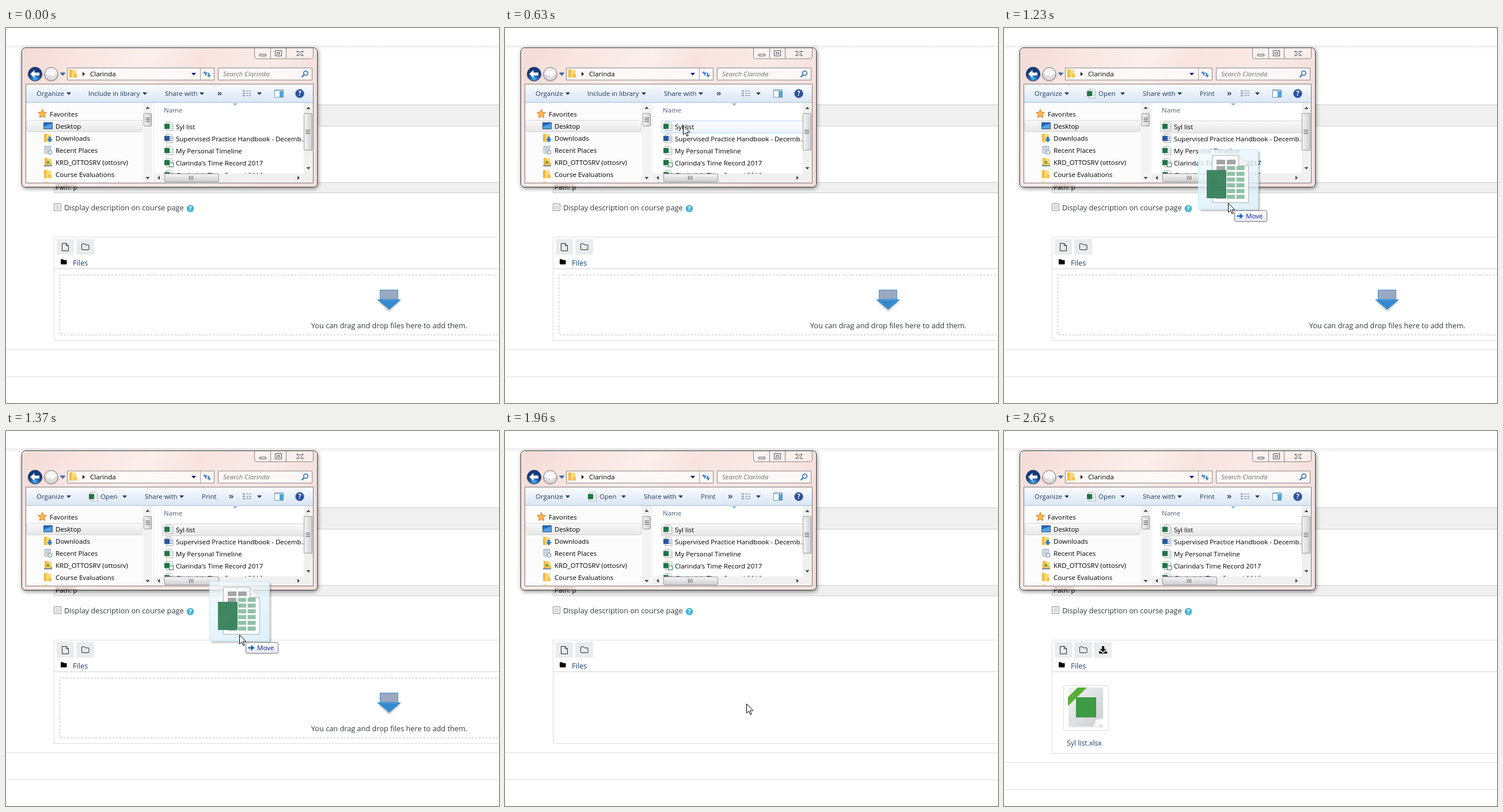
These frames come from a looping animation (856 px wide and 652 px high, 3400 ms). An HTML page:

```html
<!DOCTYPE html>
<html lang="en">
<head>
<meta charset="utf-8">
<title>Drag and drop a file</title>
<style>
html, body { margin: 0; width: 100%; height: 100%; overflow: hidden; background: #fff; }
svg { display: block; }
text { white-space: pre; }
.ui { font: 11.5px "Open Sans", "Noto Sans", sans-serif; fill: #000; }
.page { font: 12.75px "Open Sans", "Noto Sans", sans-serif; fill: #373a3c; }
.bar text { fill: #1e395b; }
.hint { font-style: italic; fill: #707070; }
.more { font-size: 15px; font-weight: 600; }
.link { fill: #14406f; }
.mid { text-anchor: middle; }
.line { fill: none; stroke: #ddd; }
.dash { fill: none; stroke: #bbb; stroke-dasharray: 3 3; }
.box { fill: #e9ecef; }
.ink { fill: none; stroke: #222; }

/* every change is a hard cut on one shared 3.4 s clock */
.t { animation: 3.4s step-end infinite; }
.pointer { animation-name: pointer; }
.path { animation-name: path; }
.ghost { animation-name: ghost; }
.hover { animation-name: hover; }
.picked { animation-name: picked; }
.held { animation-name: held; }
.idle-bar { animation-name: idle-bar; }
.file-bar { animation-name: file-bar; }
.zone { animation-name: zone; }
.invite { animation-name: invite; }
.over { animation-name: over; }
.sending { animation-name: sending; }
.done { animation-name: done; }
.grow { animation-name: grow; }

@keyframes pointer { 0% { opacity: 0 } 1.76% { opacity: 1 } 77.05%, 100% { opacity: 0 } }
@keyframes ghost { 0% { opacity: 0 } 32.05% { opacity: 1 } 57.64%, 100% { opacity: 0 } }
@keyframes hover { 0% { opacity: 0 } 18.52% { opacity: 1 } 21.17%, 100% { opacity: 0 } }
@keyframes picked { 0% { opacity: 0 } 21.17% { opacity: 1 } 32.05%, 100% { opacity: 0 } }
@keyframes held { 0% { opacity: 0 } 32.05%, 100% { opacity: 1 } }
@keyframes idle-bar { 0% { opacity: 1 } 29.11%, 100% { opacity: 0 } }
@keyframes file-bar { 0% { opacity: 0 } 29.11%, 100% { opacity: 1 } }
@keyframes zone { 0% { opacity: 1 } 57.64%, 100% { opacity: 0 } }
@keyframes invite { 0% { opacity: 1 } 43.23%, 100% { opacity: 0 } }
@keyframes over { 0% { opacity: 0 } 43.23% { opacity: 1 } 57.64%, 100% { opacity: 0 } }
@keyframes sending { 0% { opacity: 0 } 62.35% { opacity: 1 } 66.47%, 100% { opacity: 0 } }
@keyframes done { 0% { opacity: 0 } 68.23%, 100% { opacity: 1 } }
@keyframes grow { 0% { transform: none } 68.23%, 100% { transform: translateY(17px) } }
@keyframes path {
  0% { transform: translate(601px, 485px) }
  3.82% { transform: translate(560px, 428px) }
  6.17% { transform: translate(505px, 357px) }
  8.23% { transform: translate(445px, 290px) }
  10.29% { transform: translate(390px, 234px) }
  12.35% { transform: translate(346px, 196px) }
  14.41% { transform: translate(320px, 176px) }
  16.76% { transform: translate(309px, 169px) }
  29.11% { transform: translate(313px, 174px) }
  32.05% { transform: translate(322px, 192px) }
  33.82% { transform: translate(352px, 243px) }
  36.17% { transform: translate(389px, 304px) }
  38.52% { transform: translate(405px, 354px) }
  40.88% { transform: translate(412px, 400px) }
  43.23% { transform: translate(416px, 433px) }
  44.99% { transform: translate(417px, 453px) }
  47.35% { transform: translate(418px, 465px) }
  49.7% { transform: translate(419px, 471px) }
  51.47% { transform: translate(419px, 474px) }
  70.58% { transform: translate(424px, 500px) }
  72.35% { transform: translate(434px, 550px) }
  74.7%, 100% { transform: translate(446px, 612px) }
}
</style>
</head>
<body>
<svg width="856" height="652" viewBox="0 0 856 652">
<defs>
  <linearGradient id="glass" x2="1" y2=".25">
    <stop stop-color="#f3dbd7"/><stop offset=".2" stop-color="#f9e5e1"/>
    <stop offset=".42" stop-color="#fcefec"/><stop offset=".58" stop-color="#f8e3df"/>
    <stop offset=".8" stop-color="#faeae6"/><stop offset="1" stop-color="#f4dfdb"/>
  </linearGradient>
  <linearGradient id="tools" x2="0" y2="1">
    <stop stop-color="#fbfdff"/><stop offset=".5" stop-color="#e8f0f9"/><stop offset="1" stop-color="#d9e6f3"/>
  </linearGradient>
  <linearGradient id="gray" x2="0" y2="1"><stop stop-color="#fafafa"/><stop offset="1" stop-color="#e6e6e6"/></linearGradient>
  <linearGradient id="thumb" x2="0" y2="1"><stop stop-color="#f6f6f6"/><stop offset="1" stop-color="#cfcfd2"/></linearGradient>
  <linearGradient id="thumbV"><stop stop-color="#f6f6f6"/><stop offset="1" stop-color="#cfcfd2"/></linearGradient>
  <linearGradient id="pale" x2="0" y2="1"><stop stop-color="#fcfdff"/><stop offset="1" stop-color="#e9f3fd"/></linearGradient>
  <linearGradient id="blue" x2="0" y2="1"><stop stop-color="#dcebfc"/><stop offset="1" stop-color="#bfdbfb"/></linearGradient>
  <linearGradient id="top" x2="0" y2="1"><stop stop-color="#ededed"/><stop offset="1" stop-color="#fff"/></linearGradient>
  <linearGradient id="tip" x2="0" y2="1"><stop stop-color="#fff"/><stop offset="1" stop-color="#e4e5f0"/></linearGradient>
  <linearGradient id="veil" x2=".6" y2="1"><stop stop-color="#f2fafe"/><stop offset="1" stop-color="#d9eef8"/></linearGradient>
  <linearGradient id="paper" x2="1" y2="1"><stop stop-color="#f1f2f3"/><stop offset="1" stop-color="#cbcfd3"/></linearGradient>
  <radialGradient id="ball" cy=".85"><stop stop-color="#4fb4f0"/><stop offset=".6" stop-color="#1d5fb4"/><stop offset="1" stop-color="#143b7c"/></radialGradient>
  <filter id="soft" x="-10%" y="-10%" width="120%" height="120%"><feGaussianBlur stdDeviation="3.500"/></filter>
  <filter id="blur" x="-30%" y="-60%" width="160%" height="220%"><feGaussianBlur stdDeviation="1.600"/></filter>
  <clipPath id="nav"><path d="M35 130h203v138H35z"/></clipPath>
  <clipPath id="list"><path d="M257 130h260v123H257z"/></clipPath>
  <path id="down" d="M-4-2h8l-4 4.500z"/>
  <g id="sheet">
    <path d="M3.500.5h8l3.500 3.500v11.500h-11.500z" fill="#fff" stroke="#a9a9a9"/>
    <path d="M9 5.500h5M9 8.500h5M9 11.500h5" stroke="#7fb295" stroke-dasharray="2 1"/>
    <path d="M0 3.500h9v9H0z" fill="#217346"/>
  </g>
  <g id="doc">
    <path d="M3.500.5h8l3.500 3.500v11.500h-11.500z" fill="#fff" stroke="#a9a9a9"/>
    <path d="M9 5.500h5M9 8.500h5M9 11.500h5" stroke="#5c7bb5"/>
    <path d="M0 3.500h9v9H0z" fill="#2b579a"/>
  </g>
  <g id="folder">
    <path d="M1 1h6v14H1z" fill="#f3b93f"/><path d="M5 2l8 0v12l-8 2z" fill="#fbd978"/><path d="M9 9h5v6H9z" fill="#f5c24d"/>
  </g>
</defs>

<!-- course page -->
<path d="M0 30h856v7H0z" fill="url(#top)"/>
<path d="M83.500 133.500H870v37H83.500z" fill="#f0f0f0" stroke="#ccc"/>
<path d="M83.500 268.500H870v18H83.500z" fill="#f0f0f0" stroke="#ccc"/>
<path d="M83.500 305.500h12v12h-12z" fill="#f4f4f4" stroke="#8e8f8f"/>
<path d="M86 308h7v7h-7z" fill="#d9dbdd"/>
<text class="page" x="101" y="317">Display description on course page</text>
<circle cx="320" cy="314" r="6.300" fill="#45b5d6"/>
<text class="mid" x="320" y="317.800" font-family="Open Sans, sans-serif" font-size="10.500" font-weight="700" fill="#fff">?</text>

<g class="line">
  <path d="M870 363.500H83.500V543"/>
  <path d="M84 418.500h780" stroke-width="1.600"/>
  <path class="t done" d="M83.500 540v21"/>
  <path class="t grow" d="M83 543.500h780M0 559.500h856M0 606.500h856"/>
</g>
<path class="box" d="M88 367h30v27H88zM122 367h31v27h-31z"/>
<path class="ink" d="M97.500 374.500h7l4 4v9h-11zM104.500 374.500v4h4"/>
<path class="ink" d="M131.500 384.500v-8.500q0-1 1-1h3.500l1.500 2h5.500q1 0 1 1v6.500q0 1-1 1h-10.500q-1 0-1-1z"/>
<path d="M95 410v-7q0-1 1-1h3l1.500 1.500h4q1 0 1 1v5.500q0 1-1 1h-8.500q-1 0-1-1z"/>
<text class="page link" x="116" y="413">Files</text>

<g class="t zone">
  <path d="M646 475l19 18 20-18z" fill="#777" opacity=".45" filter="url(#blur)"/>
  <path d="M649.500 455.500h31v17h-31z" fill="#9ba8c2" stroke="#4a90cf"/>
  <path d="M644 472h42l-20.500 17.500z" fill="#348ad0"/>
  <path d="M650 471h30v3h-30z" fill="#4c96d3"/>
</g>
<g class="t invite">
  <path class="dash" d="M870 429.500H93.500V533.500H870"/>
  <text class="page mid" x="665.500" y="522">You can drag and drop files here to add them.</text>
</g>
<g class="t over">
  <path class="dash" d="M870 429.500H93.500V533.500H870" style="stroke:#6c8cd3"/>
  <text class="page mid" x="665" y="522">Drop files here to upload</text>
</g>
<text class="page t sending" x="94" y="445" style="font-size:11.500px">Syl list.xlsx</text>

<g class="t done">
  <path class="box" d="M156 367h31v27h-31z"/>
  <path d="M170 374h4v5h3.500l-5.500 5.500-5.500-5.500h3.500zM165 383h3l4 3.500 4-3.500h3v4h-14z" fill="#1b1b1b"/>
  <path d="M103.500 442.500h78v78h-78z" fill="#fff" stroke="#ddd"/>
  <path d="M113 514h52l6-6v7h-58z" fill="#888" opacity=".4" filter="url(#blur)"/>
  <path d="M112 446h60v54q-7 13-18 14h-42z" fill="url(#paper)"/>
  <path d="M172 500q-9 1-13 2 0 8-5 12 12-2 18-14z" fill="#fafafa"/>
  <path d="M111 463l17-17h16l-33 32z" fill="#58ad36"/>
  <path d="M125 463h35v35h-35z" fill="#3f9a46"/>
  <text class="page link" x="109" y="547" style="font-size:12.300px">Syl list.xlsx</text>
</g>

<!-- file window -->
<rect x="28" y="36" width="514" height="243" rx="7" opacity=".5" filter="url(#soft)"/>
<rect x="27.500" y="34.500" width="513" height="242" rx="6.500" fill="url(#glass)" stroke="#3d3535"/>
<rect x="28.500" y="35.500" width="511" height="240" rx="5.500" fill="none" stroke="#fff" opacity=".75"/>
<path d="M88 272h30v4H88z" opacity=".25" filter="url(#blur)"/>
<text class="ui" x="86" y="281">Path: p</text>
<path d="M84 270h40v6H84z" fill="#f0dad6" opacity=".7"/>
<path d="M431.500 35v14.500q0 4 4 4h94q4 0 4-4V35M459.500 35v18M486.500 35v18" fill="#fff" fill-opacity=".35" stroke="#8f8380"/>
<g fill="#fff" stroke="#4c4c55">
  <path d="M440.500 45.500h11v3h-11z"/>
  <path d="M467.500 39.500h11v9h-11zM470.500 42.500h5v3h-5z"/>
  <path d="M504.500 40.500h3.500l2.500 2.200 2.500-2.200h3.500l-4.200 3.700 4.200 3.800h-3.500l-2.500-2.300-2.500 2.300h-3.500l4.200-3.800z"/>
</g>
<path d="M38 80a12.500 12.500 0 0 0 25 0 2 2 0 0 0 3 0 12.500 12.500 0 0 0 25 0" fill="#777" opacity=".5" filter="url(#blur)"/>
<circle cx="50.500" cy="80" r="12" fill="url(#ball)" stroke="#2b3d5e"/>
<path d="M42 80l7.500-7v4.500h8.500v5h-8.500v4.500z" fill="#fff"/>
<circle cx="78.500" cy="80" r="11.500" fill="#dfdcdd" stroke="#77757a"/>
<path d="M68 80a10.500 10.500 0 0 1 21 0z" fill="#f5f3f3"/>
<path d="M86 80l-7-6v4h-7v4h7v4z" fill="#fff" opacity=".8"/>
<use href="#down" x="98.500" y="80" fill="#3c7cc0" stroke="#274f86"/>
<path d="M106.500 69.500h255v21h-255zM368.500 69.500h163v21h-163z" fill="#fff" fill-opacity=".72" stroke="#8c8483"/>
<path d="M337.500 70v20" stroke="#a59c9a"/>
<use href="#folder" x="109" y="71"/>
<path d="M133 76.500v7l4-3.500z"/>
<text class="ui" x="146" y="84">Clarinda</text>
<use href="#down" x="326" y="80" fill="#10107a"/>
<g fill="#2b72c4">
  <path d="M342 79l4-4.500v3h4v1.500h-2v3.500h-2v-3.500z"/>
  <path d="M356 82l-4 4.500v-3h-2.500v-1.500h1.500v-4h2v4z"/>
</g>
<text class="ui hint" x="377" y="84">Search Clarinda</text>
<g fill="none" stroke="#2d6dc0"><circle cx="520.500" cy="78.500" r="3.800" stroke-width="1.600"/><path d="M517.500 81.500l-4 4" stroke-width="2.200"/></g>

<path d="M34.500 97.500h499v172h-499z" fill="#fff" stroke="#7e7674"/>
<path d="M35 98h498v32H35z" fill="url(#tools)"/>
<path d="M35 129.500h498" stroke="#aebfd3"/>
<g class="ui bar" style="fill:#1e395b">
  <text x="53" y="118">Organize</text><use href="#down" x="109" y="114"/>
  <g class="t idle-bar">
    <text x="143" y="118">Include in library</text><use href="#down" x="241" y="114"/>
    <text x="276" y="118">Share with</text><use href="#down" x="340" y="114"/>
    <text class="more" x="367" y="118">»</text>
  </g>
  <g class="t file-bar">
    <use href="#sheet" x="144" y="106"/><text x="164" y="118">Open</text><use href="#down" x="206" y="114"/>
    <text x="241" y="118">Share with</text><use href="#down" x="305" y="114"/>
    <text x="340" y="118">Print</text>
    <text class="more" x="387" y="118">»</text>
  </g>
  <path d="M411 109.500h4M411 113.500h4M411 117.500h4" stroke="#8296ad" stroke-width="2"/>
  <path d="M417 109.500h9M417 113.500h9M417 117.500h9" stroke="#70869f" stroke-dasharray="4 1"/>
  <use href="#down" x="440" y="114"/>
  <path d="M466.500 107.500h15v13h-15z" fill="#fff" stroke="#7590ae"/><path d="M475 108h6v12h-6z" fill="#48a6d8"/><path d="M467 108h14v2h-14z" fill="#b9cbe0"/>
  <circle cx="510" cy="114" r="7.500" fill="#2a4f9c" stroke="#8093b5"/>
  <text class="mid" x="510" y="118.300" font-weight="700" style="fill:#fff">?</text>
</g>

<!-- navigation pane -->
<g class="ui" clip-path="url(#nav)">
  <path d="M35 130h203v138H35z" fill="#fcfcfd"/>
  <rect x="36.500" y="160.500" width="200" height="20" rx="2" fill="url(#gray)" stroke="#d5d5d5"/>
  <path d="M63 141.500l2.300 4.800 5.200.7-3.800 3.600.9 5.200-4.600-2.500-4.600 2.500.9-5.200-3.800-3.600 5.200-.7z" fill="#fbb753" stroke="#d67a22"/>
  <path d="M65.500 164.500h15v11h-15z" fill="#2468c0" stroke="#3d5573"/><path d="M66 171l14-5v9H66z" fill="#50a2e6"/>
  <use href="#folder" x="65" y="183"/><path d="M74 189h4v4h3l-5 6-5-6h3z" fill="#2f7fd4"/>
  <path d="M67.500 205.500h10v12h-10z" fill="#eef1f4" stroke="#8b9aab"/><path d="M69 208h7M69 211h7M69 214h5" stroke="#7a93b0"/><circle cx="76.500" cy="216" r="3.500" fill="#e5edf5" stroke="#6d8197"/>
  <use href="#folder" x="66" y="225"/><path d="M71 231h4v5h-4z" fill="#64a344"/><path d="M66 239.500h14" stroke="#6e7f93" stroke-width="2"/>
  <use href="#folder" x="65" y="246"/>
  <use href="#folder" x="65" y="266"/>
  <text x="76" y="154">Favorites</text>
  <text x="86" y="175">Desktop</text>
  <text x="86" y="196">Downloads</text>
  <text x="86" y="217">Recent Places</text>
  <text x="86" y="238">KRD_OTTOSRV (ottosrv)</text>
  <text x="86" y="259">Course Evaluations</text>
</g>
<path d="M238 130h16v139h-16z" fill="#f3f3f3"/>
<path d="M256.500 130v139" stroke="#e6e9ee"/>
<rect x="239.500" y="148.500" width="13" height="22" rx="1.500" fill="url(#thumbV)" stroke="#979797"/>
<path d="M242 156.500h8M242 159.500h8M242 162.500h8" stroke="#555"/>
<path d="M242.500 140.500l3.500-4 3.500 4zM242.500 259l3.500 4 3.500-4z" fill="#444"/>

<!-- file list -->
<g class="ui" clip-path="url(#list)">
  <path d="M394 131h8l-4 4z" fill="#78b4d8"/>
  <text x="274" y="147" style="fill:#4c607a">Name</text>
  <rect class="t hover" x="271.500" y="161.500" width="260" height="21" rx="2" fill="url(#pale)" stroke="#b8d6fb"/>
  <rect class="t picked" x="271.500" y="161.500" width="260" height="21" rx="2" fill="url(#blue)" stroke="#7da2ce"/>
  <rect class="t held" x="271.500" y="161.500" width="260" height="21" rx="2" fill="url(#gray)" stroke="#d5d5d5"/>
  <use href="#sheet" x="275" y="163"/><text x="295" y="176">Syl list</text>
  <use href="#doc" x="275" y="184"/><text x="295" y="197">Supervised Practice Handbook - Decemb...</text>
  <use href="#sheet" x="275" y="205"/><text x="295" y="218">My Personal Timeline</text>
  <use href="#sheet" x="275" y="226"/><path d="M283.500 234.500h7v7h-7z" fill="#fff" stroke="#217346"/><text x="295" y="239">Clarinda's Time Record 2017</text>
  <use href="#sheet" x="275" y="247"/><text x="295" y="260">Clarinda's Time Record 2016</text>
</g>
<path d="M517 130h16v139H257v-16h260z" fill="#f0f0f0"/>
<rect x="517.500" y="148.500" width="14" height="64" rx="1.500" fill="url(#thumbV)" stroke="#979797"/>
<rect x="275.500" y="253.500" width="94" height="14" rx="1.500" fill="url(#thumb)" stroke="#979797"/>
<path d="M520 177.500h8M520 180.500h8M520 183.500h8M318.500 257v7M321.500 257v7M324.500 257v7" stroke="#555"/>
<path d="M521.500 141l3.500-4 3.500 4zM521.500 242l3.500 4 3.500-4zM267 257l-4 3.500 4 3.500zM506 257l4 3.500-4 3.500z" fill="#444"/>

<!-- pointer with dragged file -->
<g class="t pointer"><g class="t path">
  <g class="t ghost">
    <path d="M-48 12.500H53.500V-89" fill="none" stroke="#000" stroke-width="2" opacity=".45" filter="url(#blur)"/>
    <rect x="-51.500" y="-92.500" width="104" height="104" rx="2" fill="url(#veil)" fill-opacity=".8" stroke="#c3e8f6"/>
    <g opacity=".85">
      <path d="M-27.500-82.500h46l17 18v64h-63z" fill="#fff" stroke="#a3a3a3"/>
      <path d="M18.500-82.500v18h17" fill="#f4f4f4" stroke="#a3a3a3"/>
      <path d="M-20-71h33" stroke="#989898" stroke-width="8" stroke-dasharray="15 3"/>
      <path d="M-20-60.500h15" stroke="#989898" stroke-width="7"/>
      <path d="M5-64v58" stroke="#82b99a" stroke-width="14" stroke-dasharray="7 3"/>
      <path d="M21.500-64v58" stroke="#82b99a" stroke-width="14" stroke-dasharray="7 3"/>
      <path d="M-20-10.500h15" stroke="#989898" stroke-width="7"/>
      <path d="M-37-57h34v49h-34z" fill="#217346"/>
    </g>
    <rect x="11.500" y="13.500" width="56" height="19" rx="2" fill="url(#tip)" stroke="#767676"/>
    <path d="M15.500 21.700h5v-3.700l6 5-6 5v-3.700h-5z" fill="#1666c0"/>
    <text class="ui" x="31" y="27" style="fill:#10259c">Move</text>
  </g>
  <path d="M.5.500v16l3.700-3.500 2.600 6 2.400-1-2.600-5.800h5.200z" fill="#fff" stroke="#000"/>
</g></g>
</svg>
</body>
</html>
```
